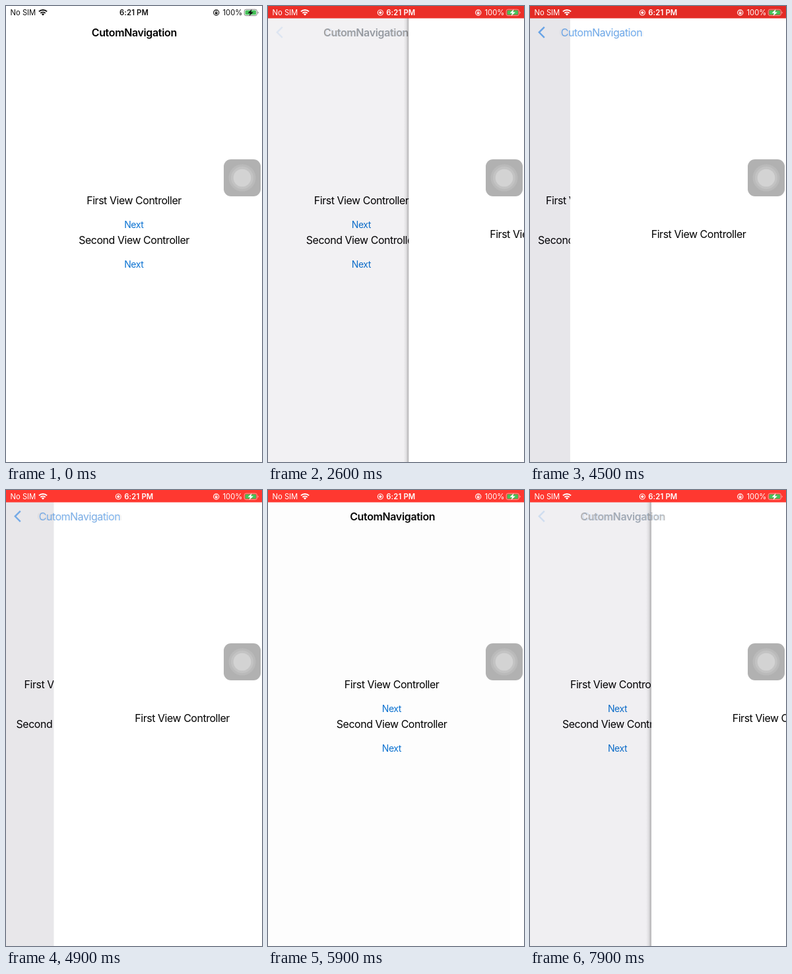
Write an HTML page that moves like this. It is 388x690 px and loops after 8 s.

```html
<!DOCTYPE html>
<html lang="en">
<head>
<meta charset="utf-8">
<title>Navigation</title>
<style>
  html, body { margin: 0; height: 100%; overflow: hidden; background: #fff; }
  svg { display: block; width: 388px; height: 690px; font-family: Inter, Roboto, sans-serif; }
  text { white-space: pre; }
  .body { font-size: 15.9px; letter-spacing: -.42px; text-anchor: middle; }
  .title { font-weight: 600; letter-spacing: -.3px; }
  .next { font-size: 14px; letter-spacing: -.45px; text-anchor: middle; fill: #0a72d2; }
  .small { font-size: 11.25px; }
  .clock { font-weight: 600; letter-spacing: .15px; text-anchor: middle; }
  .line { fill: none; stroke: currentColor; }
  #status { fill: currentColor; }
</style>
</head>
<body>
<svg viewBox="0 0 388 690">
  <defs>
    <linearGradient id="shade">
      <stop offset="0" stop-color="#000" stop-opacity="0"/>
      <stop offset=".5" stop-color="#000" stop-opacity=".07"/>
      <stop offset="1" stop-color="#000" stop-opacity=".28"/>
    </linearGradient>
  </defs>

  <rect width="388" height="690" fill="#fff"/>
  <g id="root">
    <text class="body" x="194" y="300.3">First View Controller</text>
    <text class="next" x="193.8" y="336">Next</text>
    <text class="body" x="194" y="360.3">Second View Controller</text>
    <text class="next" x="193.8" y="396.3">Next</text>
  </g>
  <rect id="dim" width="388" height="690" fill="#1a0a30"/>

  <g id="page">
    <rect id="shadow" x="-8" width="8" height="690" fill="url(#shade)"/>
    <rect width="388" height="690" fill="#fff"/>
    <text class="body" x="194.6" y="351">First View Controller</text>
  </g>

  <g id="back" fill="#1477e4">
    <path d="M21.8 31.8 13.8 39.8 21.8 47.8" fill="none" stroke="#1477e4" stroke-width="2.4"/>
    <text id="backTitle" class="body" y="45.5">CutomNavigation</text>
  </g>
  <text id="title" class="body title" y="45.5">CutomNavigation</text>

  <rect id="bar" width="388" height="18.6"/>
  <g id="status" class="small">
    <g id="sides">
      <text x="6.5" y="14">No SIM</text>
      <g class="line" stroke-width="2">
        <path d="M49.9 8.4A8.8 8.8 0 0 1 62.1 8.4"/>
        <path d="M52.3 10.9A5.3 5.3 0 0 1 59.7 10.9"/>
      </g>
      <path d="M56 14.6 53.9 12.4A3 3 0 0 1 58.1 12.4Z"/>
      <circle class="line" cx="318.7" cy="10" r="4.1" stroke-width="1.1"/>
      <rect x="316.8" y="9.5" width="3.8" height="2.8"/>
      <path class="line" d="M317.5 9.6V8.7a1.2 1.2 0 0 1 2.4 0V9.6" stroke-width=".8"/>
      <text x="328.5" y="14">100%</text>
      <rect class="line" x="361.2" y="5.2" width="19.2" height="9.4" rx="2.6" opacity=".5"/>
      <rect x="362.5" y="6.5" width="16.6" height="6.8" rx="1.5" fill="#45c058"/>
      <path d="M381.6 8.3a1.8 1.8 0 0 1 0 3.4Z" opacity=".6"/>
      <path d="M372.6 4.8 366.5 10.7H370L368.6 15.2 374.9 9.2H371.3Z"/>
    </g>
    <g id="dot">
      <circle class="line" r="4" cy="10" stroke-width="1.1"/>
      <circle r="2.1" cy="10"/>
    </g>
    <text id="recording" x="174" y="14">Recording</text>
    <text id="clock" class="clock" y="14">6:21 PM</text>
  </g>

  <g transform="translate(358 260)">
    <rect x="-28" y="-28" width="56" height="56" rx="11" fill="#b1b1b1"/>
    <circle r="20.5" fill="#bababa"/>
    <circle r="17" fill="#c3c3c3"/>
    <circle r="13.3" fill="#d3d3d3"/>
  </g>
</svg>

<script>
const LOOP = 8000, STEP = 100, W = 388;
const $ = id => document.getElementById(id);
const set = (id, attrs) => {
  for (const k in attrs) $(id).setAttribute(k, attrs[k]);
};
const clamp = x => Math.min(1, Math.max(0, x));
const mix = (a, b, k) => a + (b - a) * k;
const spring = ms => {
  const x = Math.max(0, ms) * .0102;
  const y = (1 + x) * Math.exp(-x);
  return y < .0035 ? 0 : y;
};

// Pushes: [start, end, opening position]
const pushes = [[1280, 2250, 1], [2850, 3600, .9], [6600, 7450, 1]];
// Swipes back: [time, position], 0 = page covers all, 1 = page is gone
const swipes = [
  [0, 1], [1280, 1], [2250, 0], [2400, .1], [2600, .55], [2750, .85], [2850, .9],
  [3600, .004], [4500, .157], [5400, .224], [5600, .5], [5750, .82], [5900, .945],
  [6000, .985], [6100, 1], [6600, 1], [7450, 0], [7600, .1], [7900, .474], [8000, .6]
];

function position(t) {
  const push = pushes.find(([a, b]) => t >= a && t < b);
  if (push) return [push[2] * spring(t - push[0]), true];
  const i = swipes.findIndex(([time]) => time > t);
  const [a, from] = swipes[i - 1], [b, to] = swipes[i];
  return [mix(from, to, (t - a) / (b - a)), false];
}

function drawPages(t) {
  const [p, pushing] = position(t);
  set('root', { transform: `translate(${-.3 * W * (1 - p)} 0)` });
  set('dim', { opacity: .12 * (1 - p) });
  set('page', { transform: `translate(${W * p} 0)` });
  set('shadow', { opacity: clamp((p - .23) * 5) * clamp((.92 - p) * 4) });

  const x = mix(92.5, 194.3, p) + (pushing ? 12 * p * (1 - p) : 0);
  set('backTitle', { x });
  set('title', { x, opacity: clamp(p * p * 1.1) });
  set('back', { opacity: (1 - p) ** (pushing ? .7 : 3) });
}

function drawStatus(t) {
  const red = clamp((t - 100) / 300);
  const recording = t >= 300 && t < 2400;
  const phase = t < 2300 ? .7 : (t - 5900) / 1000;
  const k = (1 + Math.cos(2 * Math.PI * phase)) / 2;
  const rgb = [mix(224, 255, k), mix(42, 56, k), mix(36, 48, k)].map(Math.round);
  set('bar', { fill: `rgb(${rgb})`, opacity: red });
  set('status', { color: red > .5 ? '#fff' : '#111' });
  set('sides', { opacity: recording ? 0 : 1 });
  set('recording', { opacity: recording ? 1 : 0 });
  set('clock', { x: red ? 201.3 : 194, opacity: recording ? 0 : 1 });
  set('dot', {
    transform: `translate(${recording ? 165.3 : 170.3} 0)`,
    opacity: red ? 1 : 0
  });
}

function frame(now) {
  const t = Math.floor(now % LOOP / STEP) * STEP;
  drawPages(t);
  drawStatus(t);
  requestAnimationFrame(frame);
}
frame(0);
</script>
</body>
</html>
```
